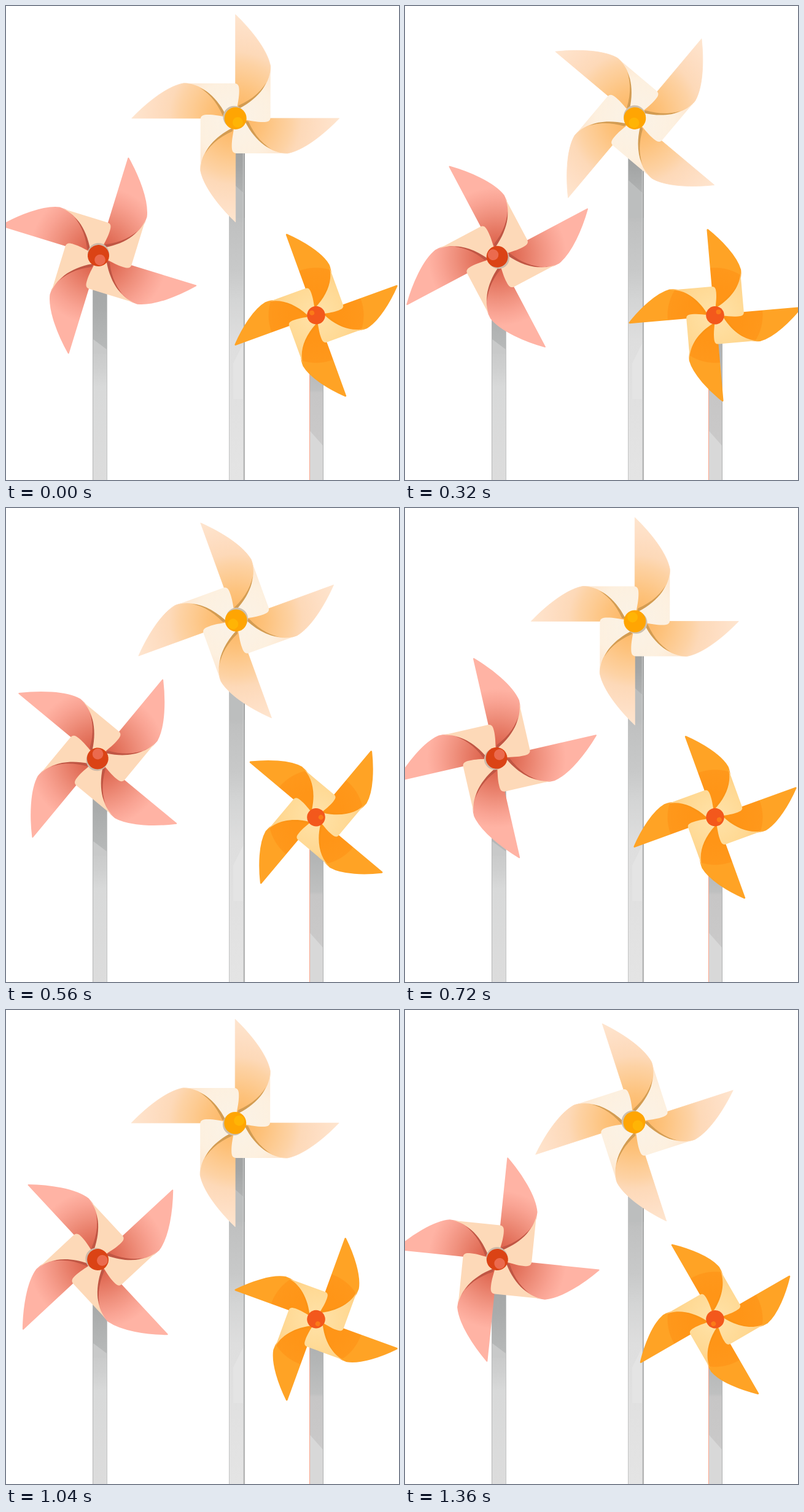
An HTML page for the animation above (1.44 s loop, 640 px wide and 772 px high).

```html
<!DOCTYPE html>
<html lang="en">
<head>
<meta charset="utf-8">
<title>Pinwheels</title>
<style>
html, body { margin: 0; width: 100%; height: 100%; overflow: hidden; background: #fff; }
svg { display: block; width: 640px; height: 772px; }
</style>
</head>
<body>
<svg id="stage" viewBox="0 0 640 772" xmlns="http://www.w3.org/2000/svg"></svg>
<script>
const STEP = 80, STEPS = 18;
const stage = document.getElementById('stage');

// Blade shapes for a wheel of radius 169, pointing up from the hub.
const FACE = 'M0 -169C24 -146 52 -112 57 -85C58 -60 40 -32 6 -16L0 0Z';
const SHADE = 'M54 -66C45 -46 28 -31 5 -21L0 0L30 -20Z';
const FOLD = 'M57 -85V-2C57 5 52 6 45 6C34 6 26 4 14 2L0 0L6 -16C39 -33 58 -60 57 -85Z';

// turns: steps taken by each successive quarter turn, counted from step `from` at angle `start`.
const wheels = [
  { id: 'cream', x: 374, y: 183.7, dx: -0.3, dy: -0.8, scale: 1, start: 180, from: 9, turns: [4, 5, 9],
    face: [[.12, '#fdb968'], [.28, '#fdc27c'], [.42, '#fdcb92'], [.54, '#fdd2a4'], [.64, '#fdd9b8'], [.8, '#fedec3'], [1, '#fee5cf']],
    fold: [[.1, '#fbf2e5'], [.38, '#fdf0df'], [.6, '#fee4cb']],
    shade: '#d39c52', hub: [18, '#ffa503'], glow: [8.5, 150, 7.5, '#ffb405'], under: [315, '#cdbfad'], trim: .8 },
  { id: 'pink', x: 150, y: 407.4, dx: .25, dy: -.9, scale: .983, start: 152.1, from: 4, turns: [4, 6, 8],
    face: [[.12, '#dd634c'], [.28, '#e77b66'], [.42, '#f0917e'], [.55, '#f9a393'], [.68, '#ffb3a4']],
    fold: [[0, '#fdd9b8'], [1, '#fdd9b8']],
    shade: '#c05644', hub: [17.8, '#db4315'], glow: [9, 143, 7.5, '#eb6a4e'], under: [342, '#cdb9a8'], trim: 2 },
  { id: 'orange', x: 505, y: 503.7, dx: 0, dy: 0, scale: .826, start: 70, from: 0, turns: [3, 6, 9],
    face: [[.3, '#ff9517'], [.55, '#ff981b'], [.56, '#ffa325'], [1, '#ffa325']],
    fold: [[.1, '#ffe0a3'], [.4, '#ffd892'], [.62, '#ffca78']],
    shade: '#fb9315', hub: [17.9, '#f3581c'], glow: [4.8, 230, 9.5, '#fb7a18'], trim: 3.4 }
];

// Poles: left, width, top, colour stops by height, slanted lighter patches, edge lines.
const poles = [
  { id: 'p1', x: 363, w: 25.5, top: 183,
    stops: [[183, '#9a9c9c'], [260, '#a3a5a5'], [320, '#b5b7b7'], [355, '#c0c1c1'], [430, '#c8c9c9'],
      [480, '#d4d5d5'], [545, '#dedede'], [772, '#e4e4e4']],
    slants: [['M363 283L388.5 306V345H363Z', '#bcbebe'], ['M388.5 545L370 582V640H388.5Z', '#e4e4e4']],
    edges: [[363.5, '#c4c5c5'], [386.5, '#d2d3d3'], [388, '#7c7e7e']] },
  { id: 'p2', x: 141, w: 24, top: 407,
    stops: [[407, '#a0a2a2'], [490, '#a9abab'], [558, '#b7b9b9'], [562, '#c9caca'], [588, '#cecfcf'],
      [620, '#d8d9d9'], [772, '#dcdcdc']],
    slants: [['M141 542L165 560V566H141Z', '#c8c9c9']],
    edges: [[141.5, '#b5b6b6'], [164.5, '#c3c4c4']] },
  { id: 'p3', x: 494, w: 23, top: 504,
    stops: [[504, '#aaacac'], [570, '#b3b5b5'], [625, '#bfc0c0'], [630, '#c7c6c6'], [718, '#cac9c9'],
      [772, '#d8d8d8']],
    slants: [['M494 691L517 717V772H494Z', '#d8d8d8']],
    edges: [[494.5, '#fba58b'], [516.5, '#aeb0b0']] }
];

const stopTags = list => list.map(([o, c]) => `<stop offset="${o}" stop-color="${c}"/>`).join('');
const radial = (id, list) =>
  `<radialGradient id="${id}" gradientUnits="userSpaceOnUse" cx="0" cy="0" r="169">${stopTags(list)}</radialGradient>`;

function polar(angle, r) {
  const a = angle * Math.PI / 180;
  return `cx="${(r * Math.sin(a)).toFixed(2)}" cy="${(-r * Math.cos(a)).toFixed(2)}"`;
}

function poleSvg(p) {
  const stops = p.stops.map(([y, c]) => [(y - p.top) / (772 - p.top), c]);
  return `<linearGradient id="${p.id}" gradientUnits="userSpaceOnUse" x1="0" x2="0" y1="${p.top}" y2="772">${stopTags(stops)}</linearGradient>
    <rect x="${p.x}" y="${p.top}" width="${p.w}" height="${772 - p.top}" fill="url(#${p.id})"/>` +
    p.slants.map(([d, c]) => `<path d="${d}" fill="${c}"/>`).join('') +
    p.edges.map(([x, c]) => `<path d="M${x} ${p.top}V772" stroke="${c}"/>`).join('');
}

function wheelSvg(w) {
  const ring = part => [0, 90, 180, 270].map(a => `<g transform="rotate(${a})">${part}</g>`).join('');
  const face = `url(#${w.id}Face)`;
  const [r, hub] = w.hub, [gr, ga, gd, glow] = w.glow;
  return radial(w.id + 'Face', w.face) + radial(w.id + 'Fold', w.fold) +
    `<g id="${w.id}" stroke-linejoin="round">` +
    ring(`<path d="${FACE}" fill="${face}" stroke="${face}" stroke-width="${w.trim}"/><path d="${SHADE}" fill="${w.shade}"/>`) +
    ring(`<path d="${FOLD}" fill="url(#${w.id}Fold)"/>`) +
    (w.under ? `<circle ${polar(w.under[0], 3.2)} r="${r}" fill="${w.under[1]}"/>` : '') +
    `<circle r="${r}" fill="${hub}"/><circle ${polar(ga, gd)} r="${gr}" fill="${glow}"/></g>`;
}

stage.innerHTML = poles.map(poleSvg).join('') + wheels.map(wheelSvg).join('');
for (const w of wheels) w.node = document.getElementById(w.id);

function angleAt(w, step) {
  let k = (step - w.from + STEPS) % STEPS, quarter = 0;
  while (k >= w.turns[quarter]) k -= w.turns[quarter++];
  return w.start + 90 * (quarter + k / w.turns[quarter]);
}

function draw(ms) {
  const step = Math.floor(ms / STEP) % STEPS;
  for (const w of wheels) {
    w.node.setAttribute('transform',
      `translate(${w.x} ${w.y}) rotate(${angleAt(w, step)}) translate(${w.dx} ${w.dy}) scale(${w.scale})`);
  }
}

let begin;
function tick(now) {
  if (begin === undefined) begin = now;
  draw(Math.max(0, now - begin));
  requestAnimationFrame(tick);
}
draw(0);
requestAnimationFrame(tick);
</script>
</body>
</html>
```
